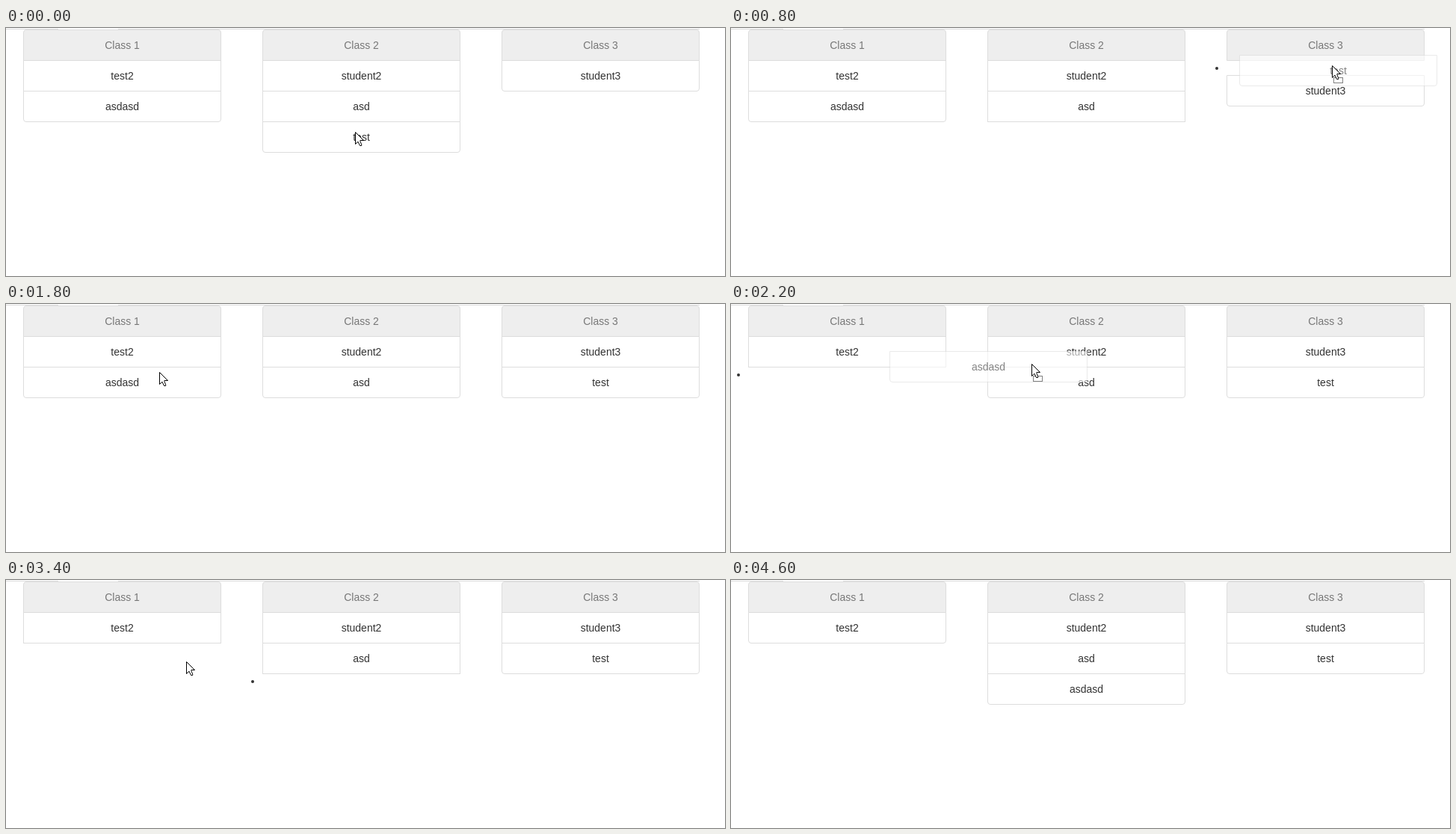
An HTML page that plays this animation: 962x332 px, repeating every 5000 ms.

```html
<!DOCTYPE html>
<html lang="en">
<head>
<meta charset="utf-8">
<title>Drag and drop class lists</title>
<style>
  html, body { margin: 0; width: 100%; height: 100%; overflow: hidden; background: #fff; }
  body { position: relative; font: 14px/20px "Liberation Sans", Arial, sans-serif; color: #333; }
  .rule { position: absolute; top: 1px; height: 1px; background: #ddd; }
  ul { position: absolute; top: 2px; width: 265px; margin: 0; padding: 0; list-style: none; }
  .item { box-sizing: border-box; width: 265px; height: 42px; margin-bottom: -1px; padding: 10px 15px;
          border: 1px solid #ddd; background: #fff; text-align: center; }
  .item:first-child { border-radius: 4px 4px 0 0; background: #eee; color: #777; }
  .item:last-child, #ghost { border-radius: 0 0 4px 4px; }
  .slot { position: relative; height: 20px; }
  .slot::before { content: ""; position: absolute; left: -15px; top: 9px; width: 4px; height: 4px;
                  border-radius: 50%; background: #333; }
  #ghost { position: absolute; left: 0; top: 0; background: #fff; color: #333; opacity: .6; }
  #cursor { position: absolute; left: 0; top: 0; width: 16px; height: 25px; }
</style>
</head>
<body>
<div class="rule" style="left:0;width:70px"></div>
<div class="rule" style="left:150px;width:778px"></div>
<ul style="left:23px"></ul>
<ul style="left:343px"></ul>
<ul style="left:663px"></ul>
<div id="ghost" class="item"></div>
<svg id="cursor" viewBox="0 0 16 25" fill="#fff" stroke="#000">
  <rect id="badge" x="2.5" y="16.5" width="12" height="7" stroke-dasharray="1 1"/>
  <path d="M.5 .5V16.5L4 13.2L6.5 18.5H8.7V17.2L6.9 12.5V11.5H11.5Z"/>
</svg>
<script>
const LOOP = 5000, SLOT = '*', HIDDEN = '-';

// Each board lists the rows of the three classes, as "class|class|class".
const boards = {
  start:       'test2 asdasd|student2 asd test|student3',
  liftTest:    'test2 asdasd|student2 asd - *|student3',
  overClass3:  'test2 asdasd|student2 asd -|* student3',
  dropTest:    'test2 asdasd|student2 asd|student3',
  moved:       'test2 asdasd|student2 asd|student3 test',
  liftAsdasd:  'test2 - *|student2 asd|student3 test',
  overClass2:  'test2 -|student2 asd *|student3 test',
  betweenRows: 'test2 -|student2 * asd|student3 test',
  end:         'test2|student2 asd asdasd|student3 test'
};

// time, board, pointer x, y, [dragged text, x, y]
const steps = [
  [0, 'start', 467, 139],
  [200, 'liftTest', 579, 104, ['test', 455, 90]],
  [400, 'liftTest', 772, 62, ['test', 648, 48]],
  [600, 'liftTest', 803, 50, ['test', 679, 36]],
  [800, 'overClass3', 804, 50, ['test', 680, 36]],
  [1000, 'dropTest', 804, 51],
  [1200, 'moved', 755, 97],
  [1400, 'moved', 552, 124],
  [1600, 'moved', 287, 86],
  [1800, 'moved', 205, 91],
  [2000, 'moved', 203, 103, ['']],
  [2200, 'liftAsdasd', 402, 80, ['asdasd', 212, 63]],
  [2400, 'overClass2', 497, 75, ['asdasd', 317, 54]],
  [2600, 'overClass2', 481, 74],
  [2800, 'overClass2', 449, 118],
  [3000, 'overClass2', 363, 133],
  [3200, 'overClass2', 244, 110],
  [3400, 'overClass2', 241, 109],
  [3600, 'betweenRows', 241, 109],
  [3800, 'end', 241, 109],
  [4200, 'end', 210, 145],
  [4400, 'end', 96, 328],
  [4600, 'end', 96, 340]
];

const lists = document.querySelectorAll('ul');
const [ghost, cursor, badge] = ['ghost', 'cursor', 'badge'].map(id => document.getElementById(id));

function row(text) {
  if (text === SLOT) return '<li class="slot"></li>';
  if (text === HIDDEN) return '<li hidden></li>';
  return `<li class="item">${text}</li>`;
}

function place(node, x, y) {
  node.style.transform = `translate(${x}px, ${y}px)`;
}

function show([, board, x, y, drag]) {
  boards[board].split('|').forEach((names, i) => {
    lists[i].innerHTML = row(`Class ${i + 1}`) + names.split(' ').map(row).join('');
  });
  const [text, ghostX = 0, ghostY = 0] = drag || [''];
  ghost.style.display = text ? 'block' : 'none';
  ghost.textContent = text;
  place(ghost, ghostX, ghostY);
  badge.style.display = drag ? 'inline' : 'none';
  place(cursor, x, y);
}

const begin = performance.now();
let current;

function tick() {
  const time = (performance.now() - begin) % LOOP;
  const step = steps.findLast(([at]) => at <= time);
  if (step !== current) show(current = step);
  requestAnimationFrame(tick);
}
tick();
</script>
</body>
</html>
```
